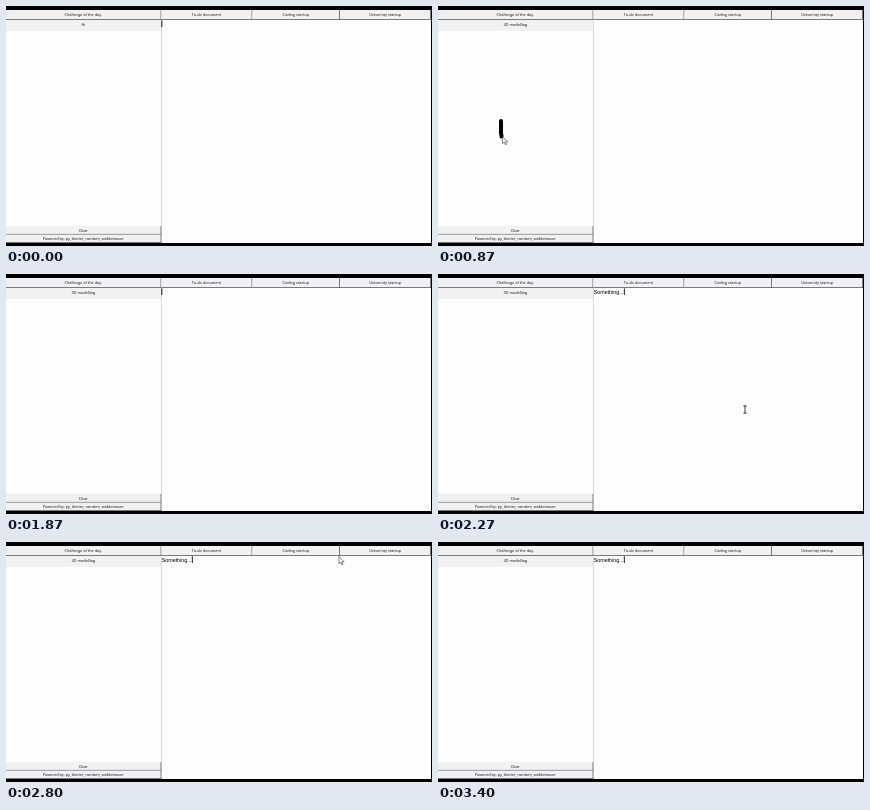
These frames come from a looping animation (426 px wide and 240 px high, 3470 ms). An HTML page:

```html
<!DOCTYPE html>
<html lang="en">
<head>
<meta charset="utf-8">
<title>Challenge board</title>
<style>
html, body { margin: 0; width: 100%; height: 100%; overflow: hidden; background: #000; }
svg { display: block; width: 100vw; height: 100vh; }
.ui { font: 3.85px "Open Sans", "Noto Sans", sans-serif; text-anchor: middle; fill: #111; }
.note { font: 5.3px "Liberation Sans", Arial, sans-serif; fill: #000; }
.face { fill: #f1f0f2; }
.edge { fill: #5c5c5c; }
.ink { fill: none; stroke: #000; stroke-width: 4; stroke-linecap: round; stroke-linejoin: round; }
</style>
</head>
<body>
<svg viewBox="0 0 426 240">
  <rect width="426" height="240"/>
  <rect y="4" width="425" height="233" fill="#fdfdfd"/>
  <rect class="face" y="14" width="155" height="11"/>
  <rect x="155" y="14" width=".8" height="206" fill="#cfcfcf"/>
  <g id="buttons"></g>
  <text id="task" class="ui" x="77.3" y="20">Hi</text>
  <path class="ink" pathLength="1" d="M63 115L63 127L64.6 137L66 146"/>
  <path class="ink" pathLength="1" d="M88.3 115L88.3 130L90.5 140L92.8 154.5"/>
  <text id="note" class="note" x="155.8" y="19.9"></text>
  <rect id="caret" y="14.3" width=".9" height="6.7"/>
  <path id="arrow" d="M0 0V7.2L1.7 5.7L2.9 8.3L4 7.8L2.9 5.3H5.1Z" fill="#fff" stroke="#333" stroke-width=".6"/>
  <path id="beam" d="M-1.6 -3.6H1.6M0 -3.6V3.6M-1.6 3.6H1.6" fill="none" stroke="#222" stroke-width=".9"/>
</svg>
<script>
const LOOP = 3470, STEPS = 52, STEP = LOOP / STEPS;
const NOTE = "Something...";
const $ = id => document.getElementById(id);
const clamp = v => Math.max(0, Math.min(1, v));
const inks = document.querySelectorAll(".ink");

// left, top, right, bottom, label
const buttons = [
  [0, 4, 155.4, 14, "Challenge of the day."],
  [155.4, 4, 246.4, 14, "To-do document"],
  [246.4, 4, 334, 14, "Coding startup"],
  [334, 4, 425, 14, "University startup"],
  [0, 220, 155.4, 228.7, "Clear"],
  [0, 228.7, 155.4, 237, "Powered by: py, tkinter, random, webbrowser"]
];
$("buttons").innerHTML = buttons.map(([l, t, r, b, label]) =>
  `<rect class="face" x="${l}" y="${t}" width="${r - l}" height="${b - t}"/>
   <rect class="edge" x="${l}" y="${b - .8}" width="${r - l}" height=".8"/>
   <rect class="edge" x="${r - .8}" y="${t}" width=".8" height="${b - t}"/>
   <text class="ui" x="${(l + r) / 2 - .4}" y="${(t + b) / 2 + 1.4}">${label}</text>`).join("");

// step, x, y of the mouse
const visits = [
  [[4, 345, 120], [6, 329, 84], [11, 100, 9], [12, 63, 115], [14, 66, 146],
   [15, 88, 115], [17, 93, 155], [20, 139, 231], [23, 80, 224], [25, 190, 120], [26, 230, 110]],
  [[33, 307, 133], [35, 307, 133], [37, 200, 9], [40, 290, 9], [42, 333, 14.5], [45, 380, 9], [47, 410, 60]]
];

function mouse(s) {
  const keys = visits.find(v => s >= v[0][0] && s <= v[v.length - 1][0]);
  if (!keys) return null;
  const i = Math.max(1, keys.findIndex(k => k[0] >= s));
  const [a, b] = [keys[i - 1], keys[i]];
  const u = clamp((s - a[0]) / (b[0] - a[0])), e = u * u * (3 - 2 * u);
  return [a[1] + (b[1] - a[1]) * e, a[2] + (b[2] - a[2]) * e];
}

function show(el, on) { el.style.display = on ? "" : "none"; }

function draw(time) {
  const s = Math.min(STEPS - 1, Math.floor((time % LOOP + 6) / STEP));

  $("task").textContent = s < 11 ? "Hi" : "3D modelling";
  [[12, 14], [15, 17]].forEach(([from, to], i) => {
    const p = clamp((s - from) / (to - from));
    inks[i].setAttribute("stroke-dasharray", `${p} 2`);
    show(inks[i], s >= from && s < 23);
  });

  const typed = Math.round(clamp((s - 28) / 5) * NOTE.length);
  $("note").textContent = NOTE.slice(0, typed);
  $("caret").setAttribute("x", 155.4 + (typed ? $("note").getComputedTextLength() + .7 : 0));
  show($("caret"), s % 8 < 5);

  const at = mouse(s);
  const beam = at && s > 23 && at[0] > 156 && at[1] > 16;
  show($("arrow"), at && !beam);
  show($("beam"), beam);
  if (at) {
    const [x, y] = at;
    $(beam ? "beam" : "arrow").setAttribute("transform", `translate(${x} ${beam ? y + 2.5 : y})`);
  }
}

function tick() {
  draw(performance.now());
  requestAnimationFrame(tick);
}
tick();
</script>
</body>
</html>
```
